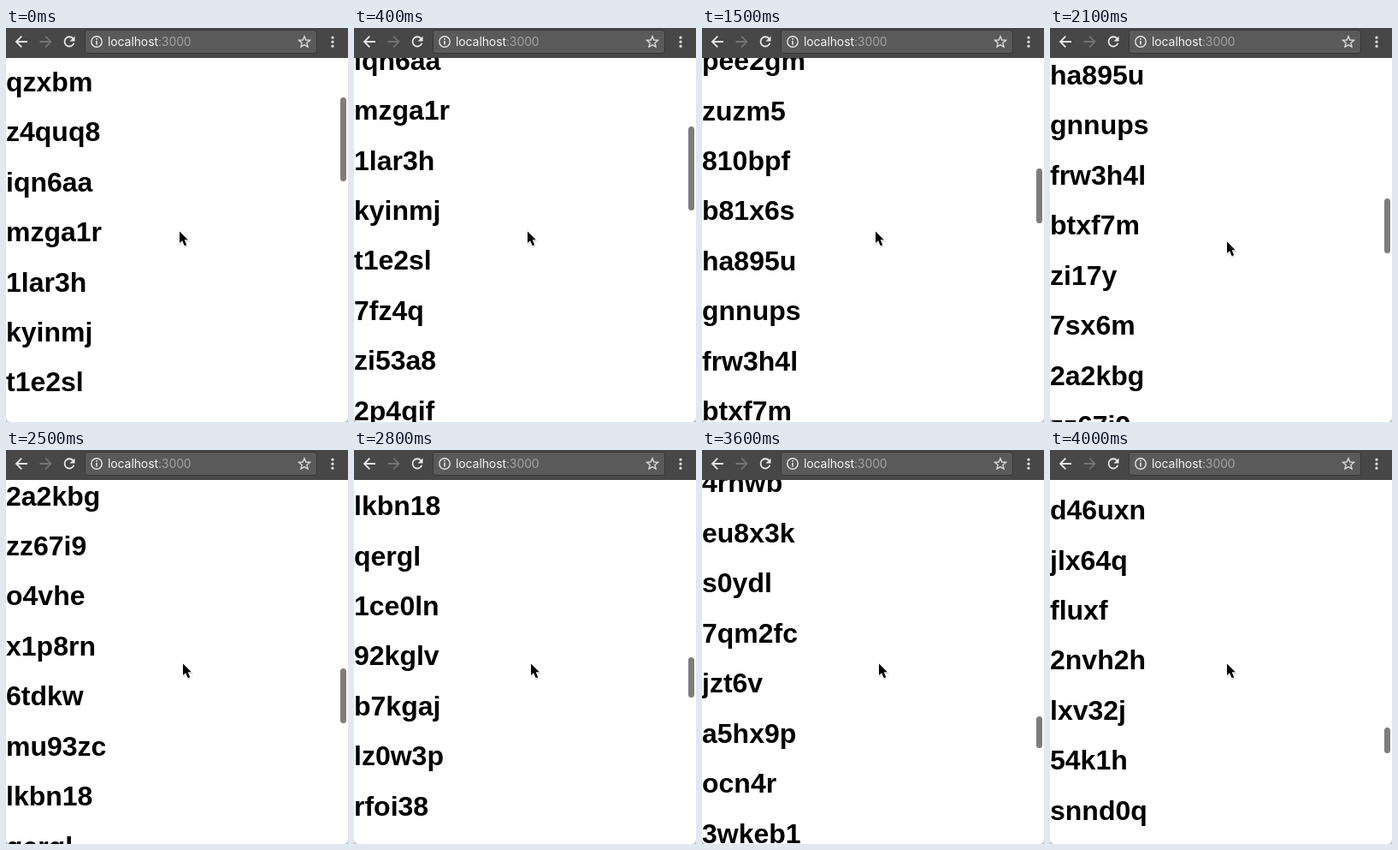
An HTML page for the animation above (4.1 s loop, 400 px wide and 460 px high).

```html
<!DOCTYPE html>
<html lang="en">
<head>
<meta charset="utf-8">
<title>Infinite scroll</title>
<style>
  html, body { margin: 0; width: 100%; height: 100%; overflow: hidden; background: #bdbdbd; }
  #stage { position: relative; width: 400px; height: 460px; overflow: hidden; }
  #bar { position: absolute; left: 0; top: 0; width: 400px; height: 35px; background: #474747; }
  #bar svg { position: absolute; left: 0; top: 0; }
  #url {
    position: absolute; left: 119px; top: 6px; color: #f3f3f3; white-space: nowrap;
    font: 14px/20px Inter, Roboto, sans-serif; letter-spacing: -.1px;
  }
  #url span { color: #a3a3a3; }
  #page {
    position: absolute; left: 0; top: 35px; width: 400px; height: 425px;
    overflow: hidden; background: #fff; border-radius: 0 0 5px 5px;
  }
  #list { position: absolute; left: 0; top: 0; }
  #list h1 {
    margin: 21.44px 0; color: #000; white-space: nowrap;
    font: bold 32px/37px "Liberation Sans", Helvetica, Arial, sans-serif;
  }
  #list h1:first-child { margin-top: 0; padding-top: 21.44px; }
  #thumb { position: absolute; left: 391px; top: 0; width: 7px; border-radius: 3.5px; background: #7d7d7d; }
  #cursor { position: absolute; left: 0; top: 0; overflow: visible; }
</style>
</head>
<body>
<div id="stage">
  <div id="page">
    <div id="list"></div>
    <div id="thumb"></div>
  </div>
  <div id="bar">
    <svg width="400" height="35" fill="none" stroke="#e6e6e6" stroke-width="1.8">
      <rect x="92.5" y="2.5" width="271" height="27" rx="3" fill="#5a5a5a" stroke="#363636" stroke-width="1"/>
      <path d="M25 16H12.5M18.3 9.7L12 16l6.3 6.3"/>
      <path d="M39.5 16H52M46.2 9.7l6.3 6.3-6.3 6.3" stroke="#747474"/>
      <path d="M78.4 12.2A5.6 5.6 0 1 0 79.4 17.8"/>
      <path d="M80.5 9.5v6h-6z" fill="#e6e6e6" stroke="none"/>
      <circle cx="106" cy="16" r="6.2" stroke-width="1.4"/>
      <path d="M106 15v4.4M106 12.1v1.7" stroke-width="1.6"/>
      <path d="M349 9.7l1.8 4.3 4.7.4-3.6 3.1 1.1 4.6-4-2.5-4 2.5 1.1-4.6-3.6-3.1 4.7-.4z" stroke="#d8d8d8" stroke-width="1.4"/>
      <g fill="#dedede" stroke="none">
        <circle cx="382" cy="11.2" r="1.6"/><circle cx="382" cy="16.2" r="1.6"/><circle cx="382" cy="21.2" r="1.6"/>
      </g>
    </svg>
    <div id="url">localhost<span>:3000</span></div>
  </div>
  <svg id="cursor" width="14" height="20">
    <path d="M0 0V13.6L3.1 10.8 5.7 16.8 8.2 15.7 5.7 9.8H9.8Z" transform="translate(.4 1.2)"
      fill="#000" fill-opacity=".18" stroke="#000" stroke-opacity=".1" stroke-width="2"/>
    <path d="M0 0V13.6L3.1 10.8 5.7 16.8 8.2 15.7 5.7 9.8H9.8Z"
      fill="#000" stroke="#fff" stroke-width="1.6" stroke-linejoin="round" paint-order="stroke"/>
  </svg>
</div>
<script>
const LOOP = 4100, STEP = 100;
const VIEW = 425, GAP = 21.44, PITCH = 58.44;
const PAGE = 15, AHEAD = 700;

const words = `h3kvt w82nq ypx5c qzxbm z4quq8 iqn6aa mzga1r 1lar3h kyinmj t1e2sl
  7fz4q zi53a8 2p4qif pee2gm zuzm5 810bpf b81x6s ha895u gnnups frw3h4l
  btxf7m zi17y 7sx6m 2a2kbg zz67i9 o4vhe x1p8rn 6tdkw mu93zc lkbn18
  qergl 1ce0ln 92kglv b7kgaj lz0w3p rfoi38 nx4uzo 5cvhua wwpic 8iphz
  3sizd 2u6tv zyl3ts w4bq2u taui3d k9o2xe vp71m ghz5aq 4rnwb eu8x3k
  s0ydl 7qm2fc jzt6v a5hx9p ocn4r 3wkeb1 xl86uz pd2gy i7vqs9 bf0nt
  m61rxa d46uxn jlx64q fluxf 2nvh2h lxv32j 54k1h snnd0q u8c5wz`.split(/\s+/);

// [time, scroll offset]
const keys = [[0, 187], [800, 479], [1500, 796], [2100, 1012.5], [2800, 1704], [3200, 2178], [4000, 3569]];

const $ = id => document.getElementById(id);
const list = $('list'), thumb = $('thumb'), cursor = $('cursor');

for (const word of words) {
  const h = document.createElement('h1');
  h.textContent = word;
  list.append(h);
}

const clamp01 = v => Math.min(1, Math.max(0, v));
const rate = i => (keys[i + 1][1] - keys[i][1]) / (keys[i + 1][0] - keys[i][0]);
const slopes = keys.map((_, i) => {
  if (i === 0) return rate(0);
  if (i === keys.length - 1) return rate(i - 1);
  const a = rate(i - 1), b = rate(i);
  return 2 * a * b / (a + b);
});

// Monotone cubic through the keys
function scrollAt(t) {
  let i = 0;
  while (i < keys.length - 2 && t >= keys[i + 1][0]) i++;
  const [t0, y0] = keys[i], [t1, y1] = keys[i + 1];
  const d = t1 - t0, u = clamp01((t - t0) / d), v = 1 - u;
  return y0 * (1 + 2 * u) * v * v + y1 * u * u * (3 - 2 * u)
    + d * u * v * (slopes[i] * v - slopes[i + 1] * u);
}

// Another page of rows loads whenever the end comes near
function contentHeight(scroll) {
  let rows = PAGE * 2;
  const height = () => rows * PITCH + GAP;
  while (height() - VIEW - scroll < AHEAD) rows += PAGE;
  return height();
}

function draw(t) {
  const scroll = scrollAt(t), ratio = VIEW / contentHeight(scroll);
  list.style.transform = `translateY(${-Math.round(scroll)}px)`;
  thumb.style.height = Math.round(VIEW * ratio - 4) + 'px';
  thumb.style.transform = `translateY(${Math.round(scroll * ratio + 1.6)}px)`;

  const u = clamp01((t - 1500) / 500), e = u * u * (3 - 2 * u);
  cursor.style.transform = `translate(${203 + 4 * e}px, ${237.5 + 12 * e}px)`;
}

const start = performance.now();
function tick() {
  const t = (performance.now() - start) % LOOP;
  draw(Math.floor(t / STEP) * STEP);
  requestAnimationFrame(tick);
}
draw(0);
requestAnimationFrame(tick);
</script>
</body>
</html>
```
